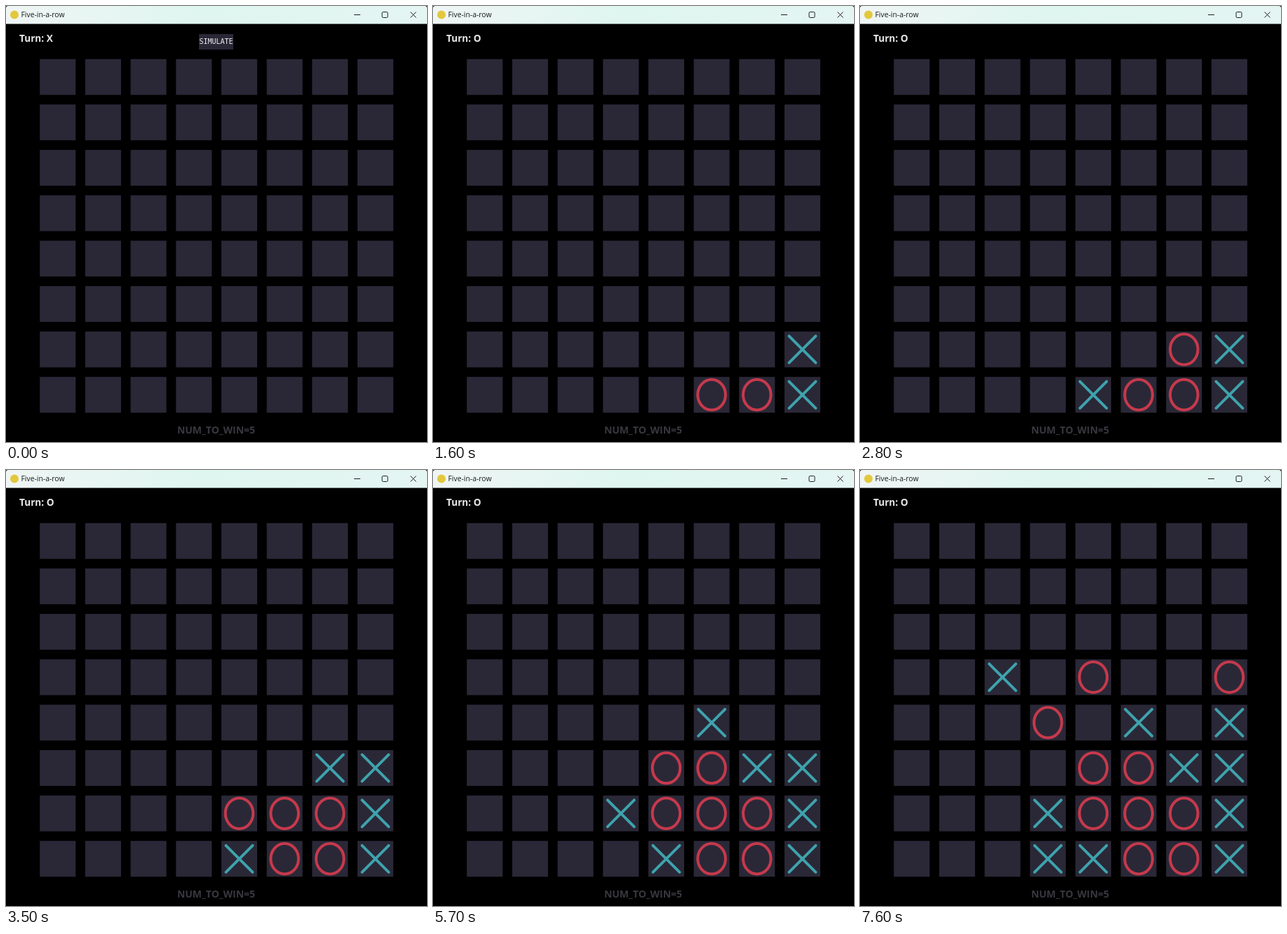
An HTML page with a canvas that plays this animation: 600x621 px, repeating every 8000 ms.

```html
<!DOCTYPE html>
<html lang="en">
<head>
<meta charset="utf-8">
<title>Five-in-a-row</title>
<style>
html, body { margin: 0; width: 100%; height: 100%; overflow: hidden; background: #000; }
canvas { display: block; }
</style>
</head>
<body>
<canvas id="stage" width="600" height="621"></canvas>
<script>
const ctx = document.getElementById('stage').getContext('2d');
const LOOP = 8000, CELLS = 8, SIZE = 51, PITCH = 64.67;
const CELL_COLOR = '#2a2837';
const SANS = '"Open Sans", "Noto Sans", sans-serif';
const ARROW = new Path2D('M0 0V11.2L2.5 8.9L4.3 12.8L6 12L4.3 8.2H7.8Z');

// The game in board notation (column a-h, row 1-8 from the top);
// each O is answered by an X at the same moment.
const moves = {
  O: 'g8 f8 g7 f7 e7 f6 e6 e4 h4 d5'.split(' '),
  X: 'h8 h7 e8 g6 h6 d7 f5 h5 d8 c4'.split(' ')
};
const turnTimes = [800, 1500, 1900, 3100, 3500, 4200, 5100, 6000, 6500, 7100];

const center = (c, r) => [73.75 + PITCH * c, 101.1 + PITCH * r];
const square = name => center(name.charCodeAt(0) - 97, name[1] - 1);

function text(str, x, y, font, color, align = 'left') {
  ctx.font = font;
  ctx.fillStyle = color;
  ctx.textAlign = align;
  ctx.fillText(str, x, y);
}

function line(x1, y1, x2, y2) {
  ctx.beginPath();
  ctx.moveTo(x1, y1);
  ctx.lineTo(x2, y2);
  ctx.stroke();
}

function cross(x, y, d) {
  line(x - d, y - d, x + d, y + d);
  line(x + d, y - d, x - d, y + d);
}

function drawTitleBar() {
  const shade = ctx.createLinearGradient(0, 0, 600, 0);
  shade.addColorStop(0, '#eff5f5');
  shade.addColorStop(0.45, '#dff6f0');
  shade.addColorStop(1, '#e4f5f2');
  ctx.fillStyle = shade;
  ctx.beginPath();
  ctx.roundRect(0, 0, 600, 25.5, [3, 3, 0, 0]);
  ctx.fill();

  ctx.fillStyle = '#e3c83c';
  ctx.beginPath();
  ctx.arc(12, 12.5, 6, 0, Math.PI * 2);
  ctx.fill();
  text('Five-in-a-row', 21.5, 16.3, `10.4px ${SANS}`, '#161a1a');

  ctx.strokeStyle = '#1c2020';
  ctx.lineWidth = 1;
  ctx.lineCap = 'butt';
  line(496, 12.5, 505, 12.5);
  ctx.beginPath();
  ctx.roundRect(536, 8.5, 8, 8, 1.5);
  ctx.stroke();
  cross(580.5, 12.5, 4);
}

function drawBoard() {
  ctx.fillStyle = CELL_COLOR;
  for (let i = 0; i < CELLS * CELLS; i++) {
    const [x, y] = center(i % CELLS, Math.floor(i / CELLS));
    ctx.fillRect(x - SIZE / 2, y - SIZE / 2, SIZE, SIZE);
  }
}

function drawO(x, y) {
  ctx.strokeStyle = '#c6394c';
  ctx.lineWidth = 4;
  ctx.beginPath();
  ctx.ellipse(x, y, 19.8, 21.8, 0, 0, Math.PI * 2);
  ctx.stroke();
}

function drawX(x, y) {
  ctx.strokeStyle = '#3ea3ad';
  ctx.lineWidth = 3.9;
  ctx.lineCap = 'round';
  cross(x, y, 19);
}

function drawCursor(t) {
  if (t < 100 || t >= 1100) return;
  const left = (1 - Math.min(1, (t - 100) / 350)) ** 2;
  ctx.save();
  ctx.translate(302.5 + 40 * left, 50.5 - 28 * left);
  ctx.fillStyle = '#fff';
  ctx.fill(ARROW);
  ctx.restore();
}

function draw(t) {
  ctx.fillStyle = '#000';
  ctx.fillRect(0, 0, 600, 621);
  drawTitleBar();

  text('Turn: ' + (t < 400 ? 'X' : 'O'), 19, 50.5, `bold 13.6px ${SANS}`, '#e8e8e8');
  if (t < turnTimes[0]) {
    ctx.fillStyle = CELL_COLOR;
    ctx.fillRect(275, 40, 49, 22);
    text('SIMULATE', 299.5, 53.5, '10px "DejaVu Sans Mono", monospace', '#eee', 'center');
  }

  drawBoard();
  const played = turnTimes.filter(at => at <= t).length;
  for (let i = 0; i < played; i++) {
    drawO(...square(moves.O[i]));
    drawX(...square(moves.X[i]));
  }
  text('NUM_TO_WIN=5', 299.5, 609, `bold 14px ${SANS}`, '#39373f', 'center');
  drawCursor(t);
}

const start = performance.now();
function tick() {
  draw((performance.now() - start) % LOOP);
  requestAnimationFrame(tick);
}
tick();
</script>
</body>
</html>
```
